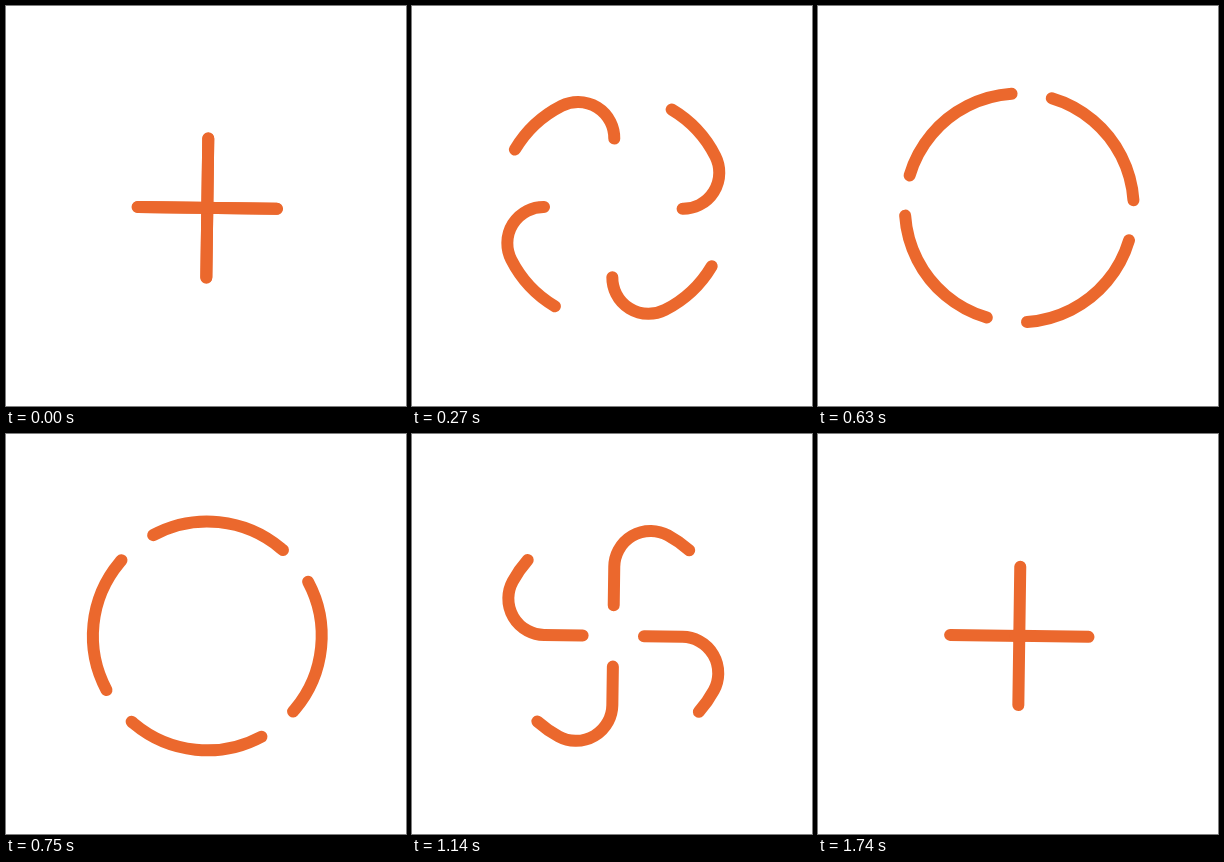
Write an HTML page that moves like this. It is 400 px wide and 400 px high and loops after 3.86 s.

```html
<!DOCTYPE html>
<html lang="en">
<head>
<meta charset="utf-8">
<title>Looping plus</title>
<style>
  html, body { margin: 0; width: 100%; height: 100%; overflow: hidden; background: #fff; }
  svg { display: block; width: 100%; height: 100%; }
  path { fill: none; stroke: #eb682d; stroke-width: 12; stroke-linecap: round; }
</style>
</head>
<body>
<svg viewBox="0 0 400 400">
  <g id="arms" transform="translate(201.3 201.9) rotate(.8)"></g>
</svg>
<script>
const LOOP = 3860, STEP = 30;
const HALF = 69.2, RADIUS = 114.4, DASH = 139;

// Bend that touches both the straight bar and the big circle from inside.
const bend = (RADIUS ** 2 - HALF ** 2) / (2 * RADIUS);
const scale = RADIUS / (RADIUS - bend);
const joinX = bend * scale, joinY = -HALF * scale;

// Up through the centre, once around the circle, back down the same bar.
const route = `M0 ${HALF}V${-HALF}
  A${bend} ${bend} 0 0 0 ${-joinX} ${joinY}
  A${RADIUS} ${RADIUS} 0 1 0 ${joinX} ${joinY}
  A${bend} ${bend} 0 0 0 0 ${-HALF}V${HALF}`;

// [time in ms, distance travelled, speed]
const keys = [
  [0, 0, 0.1],
  [270, 138.5, 0.95],
  [630, 526, 0.85],
  [900, 700, 0.5],
  [1140, 794.5, 0.38],
  [1410, 897, 0.3],
  [1740, 960, 0]
];

function distanceAt(time) {
  const next = keys.findIndex(key => key[0] > time);
  if (next < 0) return keys[keys.length - 1][1];
  const [t0, d0, v0] = keys[next - 1], [t1, d1, v1] = keys[next];
  const span = t1 - t0, u = (time - t0) / span, w = 1 - u;
  return d0 * w * w * (1 + 2 * u) + d1 * u * u * (3 - 2 * u)
    + span * u * w * (v0 * w - v1 * u);
}

const arms = [0, 90, 180, 270].map(angle => {
  const arm = document.createElementNS("http://www.w3.org/2000/svg", "path");
  arm.setAttribute("d", route);
  arm.setAttribute("transform", `rotate(${angle})`);
  arm.setAttribute("stroke-dasharray", `${DASH} 2000`);
  return document.getElementById("arms").appendChild(arm);
});

const start = performance.now();

function draw(now) {
  const time = Math.max(0, now - start) % LOOP;
  const distance = distanceAt(Math.floor(time / STEP) * STEP);
  for (const arm of arms) arm.setAttribute("stroke-dashoffset", -distance);
  requestAnimationFrame(draw);
}
draw(start);
</script>
</body>
</html>
```
